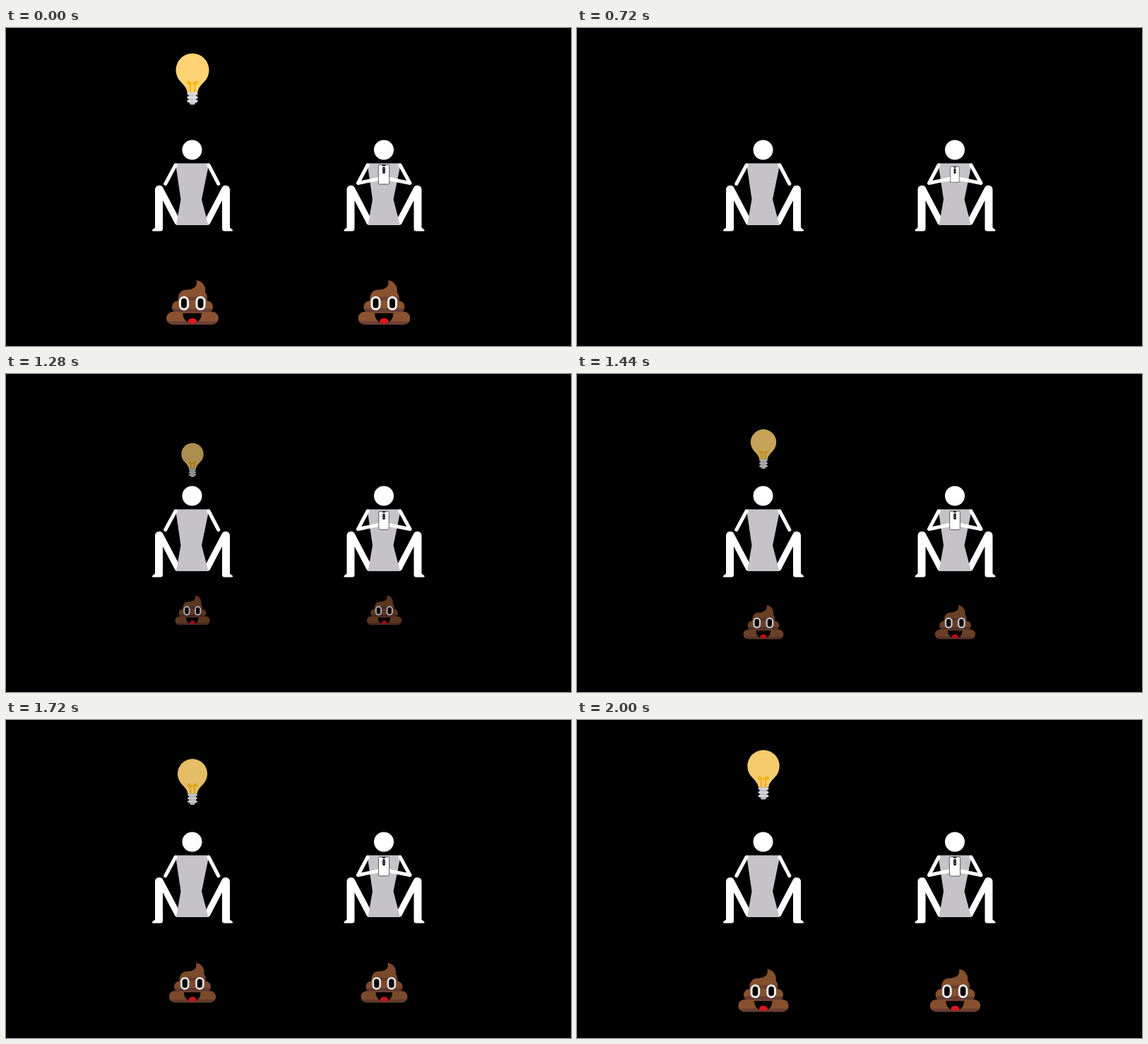
Recreate the animation shown at these times as an HTML page. Size 800x450 px, loop 2040 ms.

```html
<!DOCTYPE html>
<html lang="en">
<head>
<meta charset="utf-8">
<title>Two sitters</title>
<style>
  html, body { margin: 0; height: 100%; overflow: hidden; background: #000; }
  svg { display: block; width: 100%; height: 100%; }
</style>
</head>
<body>
<svg viewBox="0 0 800 450">
  <defs>
    <clipPath id="mouth"><path d="M250.5 403.5H277C277 412 271.5 418 263.8 418S250.5 412 250.5 403.5Z"/></clipPath>
    <clipPath id="pile">
      <path d="M269.5 357C278 358 284 366 282 374Q286.500 379 284.500 388H243.500C243 377 247 370.500 255 370.500C265 370.500 272 366 269.500 357Z"/>
      <rect x="235" y="386" width="58" height="17" rx="8.500"/>
      <rect x="227" y="401.500" width="74" height="18" rx="9"/>
    </clipPath>

    <path id="leg" fill="#fff" d="M211 229A6 6 0 0 1 222.300 226L245.500 270L242.500 279L239.500 277.500L222 244V284Q222 287.500 218.500 287.500H208Q206 287 207.500 285.300L211 282.500Z"/>

    <g id="sitter">
      <use href="#leg"/>
      <use href="#leg" transform="matrix(-1 0 0 1 528 0)"/>
      <path fill="#c5c3c7" d="M240 191.500H287.500L277 242.500L286.500 279H241L247.500 242.500Z"/>
      <circle cx="263.500" cy="172.500" r="14" fill="#fff"/>
    </g>

    <g id="poop">
      <g clip-path="url(#pile)">
        <rect x="225" y="355" width="78" height="66" fill="#8a5330"/>
        <path stroke="#6d4035" stroke-width="5" d="M240 383H290M230 399.500H298M225 417.500H303"/>
      </g>
      <g id="eye">
        <rect x="245" y="379.500" width="14" height="20" rx="7" fill="#fff"/>
        <rect x="248" y="382.500" width="8" height="14" rx="4"/>
      </g>
      <use href="#eye" x="23.500"/>
      <g clip-path="url(#mouth)">
        <rect x="250" y="403" width="28" height="16"/>
        <ellipse cx="264" cy="416.500" rx="6.500" ry="6" fill="#e3171f"/>
      </g>
    </g>

    <g id="bulb">
      <path fill="#ffd373" d="M247.500 76.300A23.500 23.500 0 1 1 280.500 76.300C275 82 271.800 86 271.500 91H256.500C256.200 86 253 82 247.500 76.300Z"/>
      <g fill="none" stroke="#fab514" stroke-width="2.200">
        <path d="M260.800 91V78.500H267.200V91"/>
        <circle cx="258.800" cy="77.500" r="1.700"/>
        <circle cx="269.200" cy="77.500" r="1.700"/>
      </g>
      <path fill="#c4c3c9" d="M258.500 91H269.500V104L267 108.500H261L258.500 104Z"/>
      <path stroke="#dddce1" stroke-width="3.400" stroke-linecap="round" d="M258 92.700H270M258 98.200H270M258 103.500H270"/>
    </g>
  </defs>

  <rect width="800" height="450"/>
  <g class="grow" data-y="222"><use href="#bulb"/></g>
  <g class="grow" data-y="225"><use href="#poop"/></g>
  <g transform="translate(271.500)"><g class="grow" data-y="225"><use href="#poop"/></g></g>

  <use href="#sitter"/>
  <use href="#sitter" x="271.500"/>
  <g fill="none" stroke="#fff" stroke-width="5" stroke-linecap="round" stroke-linejoin="round">
    <path d="M240 194L225.700 220.500M287 194L300.800 220.500"/>
    <path d="M512 194L498.500 219.500L528 213.500M558 194L572 219.500L542 213.500"/>
  </g>

  <g id="phone">
    <rect x="527.300" y="193.500" width="15.400" height="27.500" rx="1.800" fill="#fff" stroke="#333" stroke-width=".8"/>
    <rect x="532.500" y="193.700" width="5" height="1.500" rx=".6"/>
    <rect x="533.200" y="196.500" width="3.600" height="9.500" rx="1.800"/>
    <g fill="#fff"><circle cx="535" cy="199" r=".7"/><circle cx="535" cy="202.500" r=".7"/></g>
  </g>
</svg>
<script>
  const LOOP = 2040, STEP = 40;
  const growing = document.querySelectorAll('.grow');
  const phone = document.getElementById('phone');

  const scaleAbout = (x, y, s) => `translate(${x} ${y}) scale(${s}) translate(${-x} ${-y})`;
  const easeOut = u => 1 - (1 - Math.min(1, Math.max(0, u))) ** 3;

  // Quick collapse, a pause, then a long eased growth cut off by the loop.
  const progress = t => t < 676 ? 1 - easeOut(t / 240) : easeOut((t - 676) / 1960);

  const start = performance.now();
  function draw(now) {
    const elapsed = Math.max(0, now - start) % LOOP;
    const p = progress(Math.floor(elapsed / STEP) * STEP);
    for (const g of growing) {
      g.setAttribute('transform', scaleAbout(264, +g.dataset.y, p));
      g.setAttribute('opacity', p);
    }
    phone.setAttribute('transform', scaleAbout(535, 207.2, 0.8 + 0.2 * p));
    requestAnimationFrame(draw);
  }
  draw(start);
</script>
</body>
</html>
```
